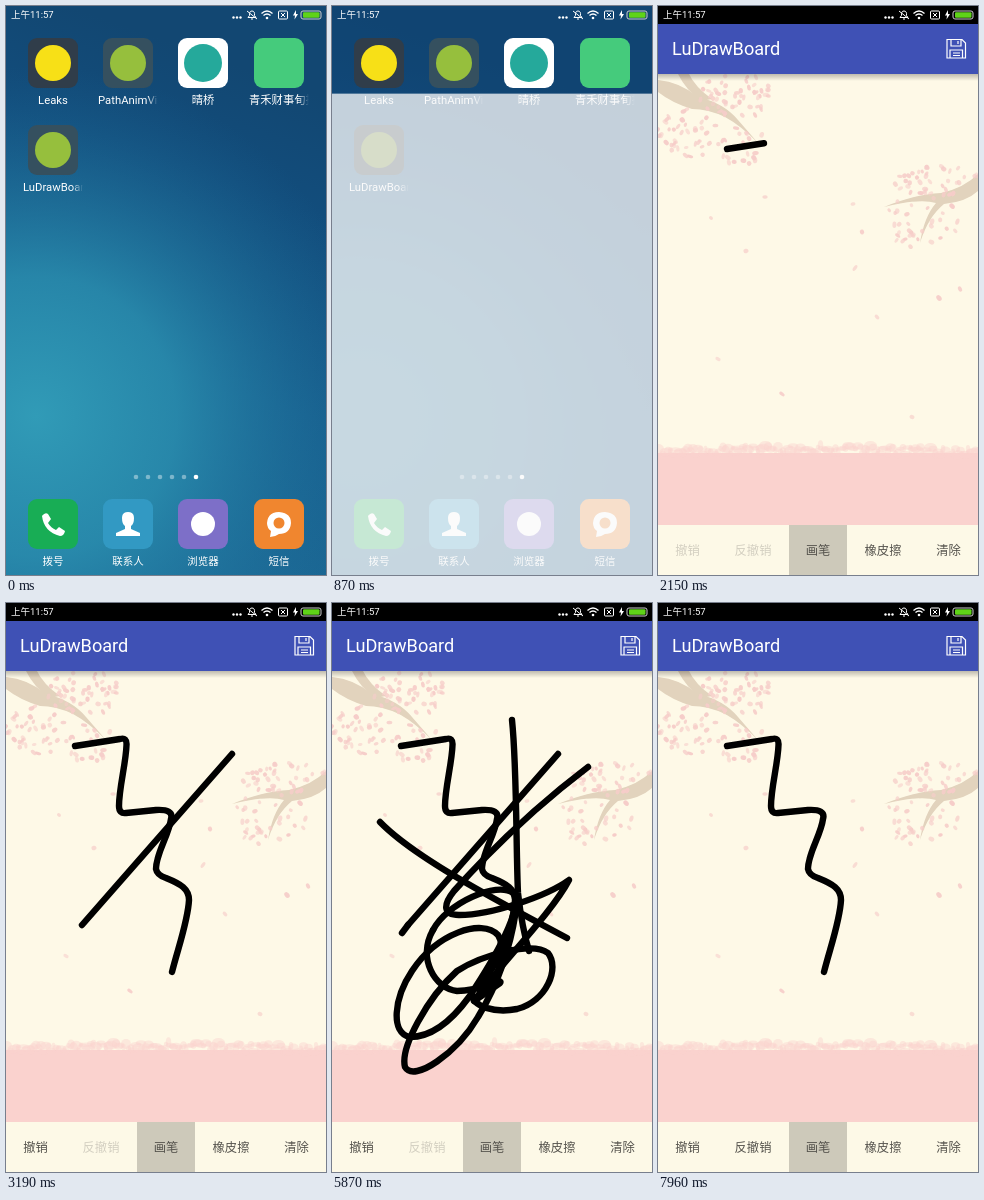
An HTML page for the animation above (8 s loop, 320 by 569 pixels).

```html
<!DOCTYPE html>
<html lang="zh">
<head>
<meta charset="utf-8">
<style>
  html, body { margin: 0; width: 100%; height: 100%; overflow: hidden; background: #000; }
  svg { display: block; width: 100vw; height: 100vh; }
  text { font-family: Roboto, "Noto Sans CJK SC", "Noto Sans CJK", sans-serif; }
</style>
</head>
<body>
<svg id="stage" viewBox="0 0 320 569">
  <defs>
    <linearGradient id="sky" x1=".2" x2="0" y2="1">
      <stop stop-color="#124772"/><stop offset=".2" stop-color="#124d7c"/>
      <stop offset=".55" stop-color="#175f8e"/><stop offset="1" stop-color="#1d6c97"/>
    </linearGradient>
    <radialGradient id="glow" gradientUnits="userSpaceOnUse" cx="30" cy="410" r="350">
      <stop stop-color="#319bb7"/><stop offset=".4" stop-color="#2b90b0" stop-opacity=".8"/>
      <stop offset="1" stop-color="#1b6796" stop-opacity="0"/>
    </radialGradient>
    <linearGradient id="shadow" x2="0" y2="1">
      <stop stop-opacity=".25"/><stop offset="1" stop-opacity="0"/>
    </linearGradient>
    <linearGradient id="fade" gradientUnits="userSpaceOnUse" x1="-30" x2="30">
      <stop offset=".82" stop-color="#fff"/><stop offset="1" stop-color="#fff" stop-opacity="0"/>
    </linearGradient>
    <mask id="labelMask" maskUnits="userSpaceOnUse" x="-30" y="0" width="60" height="80">
      <rect x="-30" width="60" height="80" fill="url(#fade)"/>
    </mask>
  </defs>

  <g id="home">
    <rect width="320" height="569" fill="url(#sky)"/>
    <rect width="320" height="569" fill="url(#glow)"/>
    <rect id="shade" width="320" height="569" fill="#0f4272"/>
    <g id="tiles"></g>
    <g id="dots" fill="#fff"></g>
    <rect id="sheet" width="320" height="569" fill="#fafafa"/>
  </g>

  <g id="app">
    <rect width="320" height="569" fill="#fef9e7"/>
    <g fill="#e2d3bd">
      <path d="M0 74Q22 76 40 91Q66 97 80 114L100 137Q82 119 67 111Q50 103 34 103Q14 97 0 86Z"/>
      <path d="M20 68H31Q37 81 54 93L43 95Q28 84 20 68Z"/>
      <path d="M320 168Q306 182 283 187Q258 188 226 201Q262 192 278 197Q266 211 262 237Q270 211 286 198Q308 196 320 185Z"/>
    </g>
    <g id="petals" fill="#f6cdc9"></g>
    <g id="ground" fill="#fad2ce"></g>
    <g id="strokes" fill="none" stroke="#000" stroke-width="6.4" stroke-linecap="round" stroke-linejoin="round"></g>
    <rect y="68" width="320" height="7" fill="url(#shadow)"/>
    <rect y="519" width="320" height="50" fill="#fdf9e7"/>
    <g id="buttons"></g>
    <rect y="17" width="320" height="51" fill="#3f51b5"/>
    <rect id="veil" width="320" height="569" fill="#fff"/>
    <text x="14" y="49.300" font-size="18.150" fill="#fff">LuDrawBoard</text>
    <path d="M289 33.500H304L307.500 37V52H289ZM293 34V40H303V34M300 35V38M292 52V44H304.500V52M295 47H302M295 49.500H302"
      fill="none" stroke="#fff" stroke-width="1.200"/>
    <rect width="320" height="18"/>
  </g>

  <g fill="#fff">
    <text x="5" y="12.300" font-size="9.500">上午11:57</text>
    <circle cx="227.500" cy="11.500" r="1.200"/><circle cx="231" cy="11.500" r="1.200"/><circle cx="234.500" cy="11.500" r="1.200"/>
    <g fill="none" stroke="#fff">
      <path d="M242 11.500L243.500 9.500Q243 5 246 5Q249 5 248.500 9.500L250 11.500ZM245 13H247M241 5L251 13"/>
      <path d="M255.500 7.500Q261 2.500 266.500 7.500M257.500 9.500Q261 6.500 264.500 9.500" stroke-width="1.300"/>
      <rect x="272.500" y="5" width="9" height="8" rx="1"/><path d="M275 7L279 11M279 7L275 11"/>
      <rect x="295" y="5" width="20" height="8" rx="2" stroke="#ccc"/>
    </g>
    <circle cx="261" cy="12" r="1.300"/>
    <path d="M290 4L287 9.500H289L288.500 13.500L292 8H290Z"/>
    <rect x="297" y="6.300" width="16.500" height="5.400" rx="1" fill="#5fd318"/>
  </g>
</svg>

<script>
const LOOP = 8000;
const $ = id => document.getElementById(id);
const clamp = v => Math.max(0, Math.min(1, v));
const ramp = (t, from, to) => clamp((t - from) / (to - from));
const show = (el, on) => el.setAttribute('visibility', on ? 'inherit' : 'hidden');

let seed = 11;
const random = () => (seed = seed * 16807 % 2147483647) / 2147483647;
const between = (a, b) => a + random() * (b - a);

// Home screen: tiles are drawn around their top centre
const disc = (color, r = 18) => `<circle cy="25" r="${r}" fill="${color}"/>`;
const phone = '<path d="M-11 17Q-8 13 -5 15L-2 20L-5 24Q-2 29 3 31L6 28L12 32Q11 37 7 37Q-9 33 -11 17Z" fill="#fff"/>';
const person = '<path d="M-6 19Q-6 13 0 13Q6 13 6 19Q6 25 3 27V30L12 34V37H-12V34L-3 30V27Q-6 25 -6 19Z" fill="#fff"/>';
const bubble = '<path d="M-9 38L-8 32Q-12 29 -12 24Q-11 13 0 13Q12 14 12 24Q11 35 0 35Q-4 38 -9 38Z" fill="#fff"/><circle cy="24" r="5.500" fill="#f0862f"/>';
const tiles = [
  [47, 32, '#303d4a', 'Leaks', disc('#f7e017')],
  [122, 32, '#35505f', 'PathAnimView', disc('#96bf3d')],
  [197, 32, '#fff', '晴桥', disc('#25a99b', 19)],
  [273, 32, '#45cb7c', '青禾财事旬报', ''],
  [47, 119, '#35505f', 'LuDrawBoard', disc('#96bf3d')],
  [47, 493, '#18ad55', '拨号', phone],
  [122, 493, '#3299c3', '联系人', person],
  [197, 493, '#7d6fc8', '浏览器', disc('#fff', 12)],
  [273, 493, '#f0862f', '短信', bubble]
];
$('tiles').innerHTML = tiles.map(([x, y, color, label, mark]) => {
  const long = label.length > 5;
  return `<g transform="translate(${x} ${y})">
    <rect x="-25" width="50" height="50" rx="9" fill="${color}"/>${mark}
    <g mask="url(#labelMask)"><text x="${long ? -30 : 0}" y="65.500" font-size="${y > 400 ? 10.5 : 11.3}"
      fill="#fff" text-anchor="${long ? 'start' : 'middle'}">${label}</text></g></g>`;
}).join('') + '<rect id="press" x="22" y="119" width="50" height="50" rx="9" opacity=".35"/>';
$('dots').innerHTML = [0, 1, 2, 3, 4, 5].map(i =>
  `<circle cx="${130 + i * 12}" cy="471" r="2.300" opacity="${i === 5 ? 1 : .4}"/>`).join('');

// Wallpaper of the drawing board
const petal = (x, y) => `<ellipse rx="${between(2, 3.3)}" ry="${between(1.5, 2.4)}" opacity="${between(.55, 1)}"
  transform="translate(${x} ${y}) rotate(${between(0, 180)})"/>`;
const cluster = (count, cx, cy, rx, ry) => Array.from({ length: count }, () => {
  const angle = between(0, 2 * Math.PI), r = Math.sqrt(random());
  return petal(cx + rx * r * Math.cos(angle), cy + ry * r * Math.sin(angle));
}).join('');
const loose = [[195, 198], [204, 226], [53, 212], [88, 245], [197, 262], [219, 311],
  [124, 388], [254, 411], [60, 353], [302, 283], [281, 292], [107, 191]];
$('petals').innerHTML = cluster(52, 78, 90, 36, 23) + cluster(40, 32, 128, 34, 25) + cluster(20, 88, 142, 26, 24)
  + cluster(40, 275, 174, 46, 16) + cluster(34, 264, 214, 38, 28) + loose.map(p => petal(...p)).join('');
$('ground').innerHTML = '<rect y="447" width="320" height="72"/>' + Array.from({ length: 130 }, (_, i) => {
  const x = i * 2.5, y = 446 - 3 * Math.sin(x / 95) + between(-4, 4);
  return `<ellipse cx="${x}" cy="${y}" rx="${between(2, 7)}" ry="${between(2, 5)}" opacity=".45"/>`;
}).join('');

// Pen strokes: start, end, time of undo, path
const strokes = [
  [2090, 2670, LOOP, 'M69 143L114 136Q121 134 120.500 142C120 160 113 185 113 203Q113 211 120 210L150 207Q168 206 165 216C163 232 150 250 150 266Q151 272 160 275C175 281 183 286 183 297C182 318 172 345 166 369'],
  [2960, 3190, 7960, 'M226 151L76 322'],
  [3430, 3430, 7960, 'M76 322L70 330'],
  [3430, 3660, 7800, 'M48 219C80 252 150 290 235 335'],
  [3830, 4080, 7430, 'M180 117C185 165 184 250 186 290Q190 325 197 348'],
  [4200, 5000, 7140, 'M256 164C215 195 165 240 122 288C110 303 112 312 127 312C160 312 215 293 237 277C220 310 165 365 142 398L168 380C172 374 150 388 125 388C103 386 85 355 101 327'],
  [5000, 5400, 7140, 'M101 327C115 300 165 278 181 290C192 304 163 355 137 394C118 420 98 434 78 434'],
  [5400, 6040, 7140, 'M78 434C58 430 62 395 80 368C105 330 150 315 166 332C178 350 150 380 140 388C138 405 165 410 185 406C215 398 228 365 216 350C200 338 150 352 125 368C95 395 68 445 73 464C82 480 125 450 146 414C170 375 182 330 185 298C215 275 275 255 295 263C308 275 255 335 222 392']
];
$('strokes').innerHTML = strokes.map(s => `<path d="${s[3]}" pathLength="1"/>`).join('');
const strokeEls = [...$('strokes').children];

const undoPresses = [[7030, 7140], [7320, 7430], [7730, 7800], [7880, 7960]];
const buttons = [['撤销', 0, 59], ['反撤销', 59, 131], ['画笔', 131, 189], ['橡皮擦', 189, 261], ['清除', 261, 320]];
$('buttons').innerHTML = buttons.map(([label, left, right]) =>
  `<rect x="${left}" y="519" width="${right - left}" height="50" fill="#cdc9ba"/>
   <text x="${(left + right) / 2}" y="549" font-size="12.300" text-anchor="middle">${label}</text>`).join('');
const cells = [...$('buttons').querySelectorAll('rect')];
const labels = [...$('buttons').querySelectorAll('text')];

function draw(t) {
  const inApp = t >= 1050;
  show($('home'), !inApp);
  show($('app'), inApp);

  const opening = ramp(t, 640, 940);
  show($('press'), t >= 460);
  $('shade').setAttribute('opacity', .7 * opening);
  $('sheet').setAttribute('opacity', opening);
  $('sheet').setAttribute('y', 113 - 45 * ramp(t, 640, 1050));
  $('veil').setAttribute('opacity', 1 - ramp(t, 1050, 1280));

  strokes.forEach(([start, end, undone], i) => {
    show(strokeEls[i], inApp && t >= start && t < undone);
    const done = end > start ? ramp(t, start, end) : 1;
    strokeEls[i].setAttribute('stroke-dasharray', done < 1 ? `${done} 2` : 'none');
  });

  const pressed = undoPresses.some(([from, to]) => t >= from && t < to);
  cells.forEach((cell, i) => show(cell, inApp && (i === 2 || i === 0 && pressed)));
  const enabled = [t >= 2670, t >= 7140, true, true, true];
  labels.forEach((label, i) => label.setAttribute('fill', enabled[i] ? '#55534d' : '#d3cfc1'));
}

function tick() {
  draw(performance.now() % LOOP);
  requestAnimationFrame(tick);
}
tick();
</script>
</body>
</html>
```
